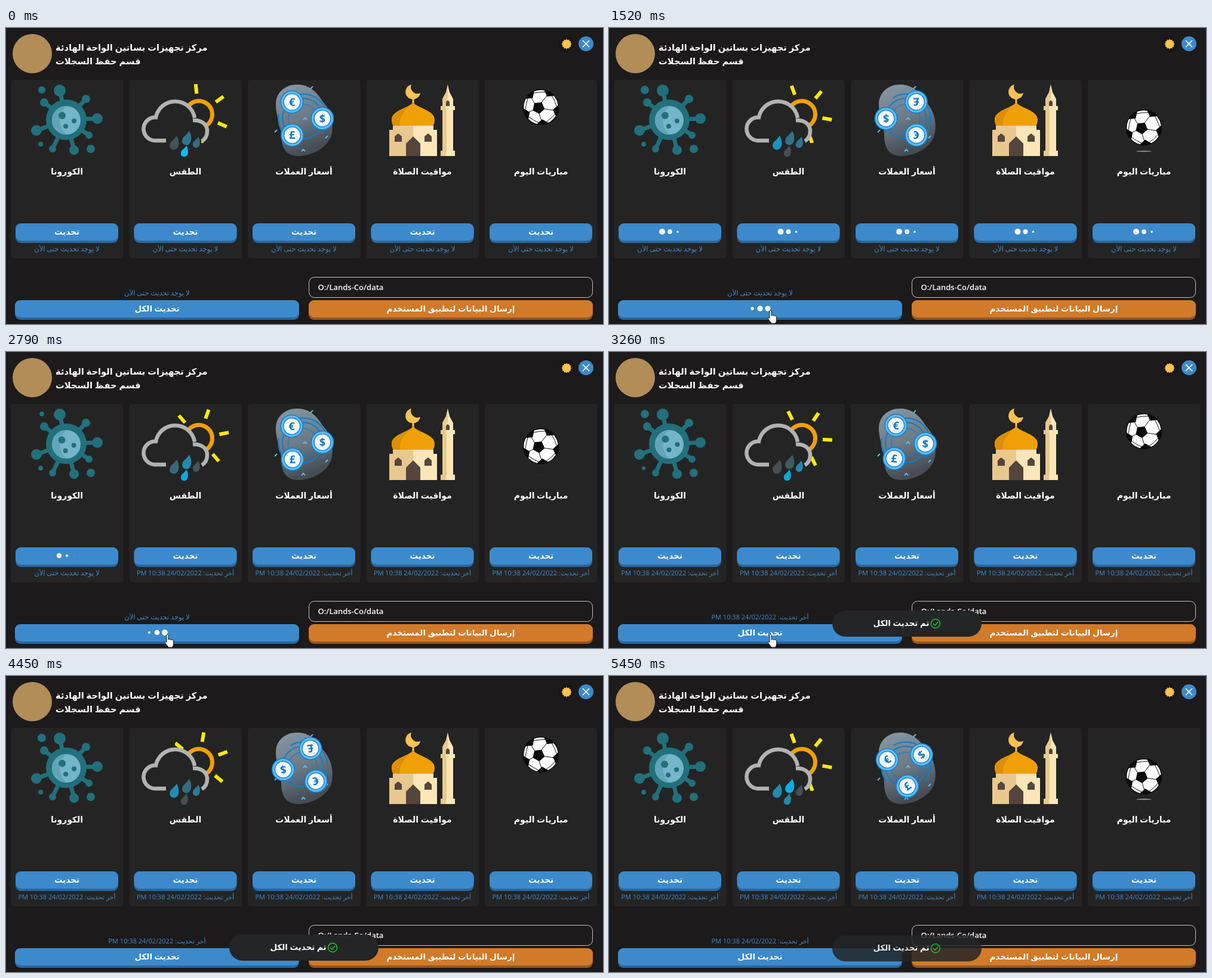
Write an HTML page that moves like this. It is 1000 px wide and 497 px high and loops after 5520 ms.

```html
<!DOCTYPE html>
<html lang="ar">
<head>
<meta charset="utf-8">
<title>لوحة التحديث</title>
<style>
  html, body { margin: 0; width: 100%; height: 100%; overflow: hidden; background: #1c1a1b; }
  svg { display: block; width: 100%; height: 100%; }
  text { direction: rtl; text-anchor: middle; fill: #fff; font: bold 14px "Open Sans", "DejaVu Sans", sans-serif; }
  .head { text-anchor: end; font-size: 14.7px; }
  .btn { font-size: 13.5px; }
  .status { font-size: 11.4px; font-weight: 400; fill: #3d8ccd; }
  .date { font-size: 11px; }
  .path { direction: ltr; text-anchor: start; font-size: 13px; font-weight: 600; }
  .coin { direction: ltr; font-size: 18px; fill: #0f72c4; }
</style>
</head>
<body>
<script>
const LOOP = 5520;
const NONE = 'لا يوجد تحديث حتى الأن';
const DATE = 'أخر تحديث: 24/02/2022 10:38 PM';
const TITLES = ['الكورونا', 'الطقس', 'أسعار العملات', 'مواقيت الصلاة', 'مباريات اليوم'];
const CARD_DONE = [2900, 2600, 2350, 2200, 2000];
const CARD_START = 1290, ALL_START = 1114, ALL_DONE = 2980;

const rad = a => a * Math.PI / 180;
const clamp = x => Math.max(0, Math.min(1, x));
const smooth = x => x * x * (3 - 2 * x);
const mix = (a, b, k) => a + (b - a) * k;
const list = (n, f) => Array.from({ length: n }, (_, i) => f(i)).join('');

const text = (x, y, s, cls = '', more = '') => `<text x="${x}" y="${y}" class="${cls}" ${more}>${s}</text>`;
const rect = (x, y, w, h, rx, fill, more = '') =>
  `<rect x="${x}" y="${y}" width="${w}" height="${h}" rx="${rx}" fill="${fill}" ${more}/>`;
const disc = (x, y, r, fill, more = '') => `<circle cx="${x}" cy="${y}" r="${r}" fill="${fill}" ${more}/>`;
const path = (d, fill, more = '') => `<path d="${d}" fill="${fill}" ${more}/>`;
const polar = (x, y, r, a) => [x + r * Math.cos(rad(a)), y + r * Math.sin(rad(a))];
const poly = (x, y, n, r, turn = 0) =>
  'M' + Array.from({ length: n }, (_, i) => polar(x, y, r, turn + i * 360 / n).map(v => v.toFixed(1))).join('L') + 'Z';

const button = (x, y, w, fill, shade) => rect(x, y, w, 33, 9, shade) + rect(x, y, w, 29, 9, fill);
const dots = (x, y, id) =>
  `<g id="${id}">` + list(3, i => disc(x + (i - 1) * 13, y, 5, '#fff')) + '</g>';

function virus() {
  const knobs = [[90, 105, 10], [134, 119, 7], [153, 152, 9], [139, 180, 6],
    [114, 205, 8], [78, 203, 6], [51, 172, 9], [64, 125, 7]];
  const teal = '#22707c';
  return knobs.map(([x, y, r]) =>
      path(`M101 154L${x} ${y}`, 'none', `stroke="${teal}" stroke-width="7"`) + disc(x, y, r, teal)).join('') +
    disc(101, 154, 34, teal) + disc(101, 155, 24, '#74b5c9') +
    path('M101 131A24 24 0 0 0 101 179A32 32 0 0 1 101 131Z', '#62a5ba') +
    `<g id="spots">${disc(94, 147, 6, teal)}${disc(114, 156, 4, teal)}${disc(100, 165, 4, teal)}</g>` +
    disc(60, 104, 7, teal, 'id="speckA"') + disc(58, 195, 4, teal, 'id="speckB"') + disc(142, 203, 7, teal, 'id="speckC"');
}

function weather() {
  const drop = (x, y, s) => path('M4 -14C10 -5 9 10 0 11C-10 11 -10 1 -5 -4C-1 -8 2 -10 4 -14Z', '#4a4f52',
    `class="drop" transform="translate(${x} ${y}) scale(${s})"`);
  const top = 'M268 189H249A19.5 19.5 0 0 1 251 150A33 33 0 0 1 316 151';
  const side = '155C329 154 337 163 337 173C337 181 333 187 328 190';
  return '<g clip-path="url(#sky)"><g id="rays" stroke="#ffea00" stroke-width="6">' +
    list(6, i => `<path d="M358 145H374" transform="rotate(${i * 60} 323 145)"/>`) + '</g></g>' +
    '<circle cx="323" cy="145" r="22.5" fill="#242424" stroke="#f0a000" stroke-width="7"/>' +
    path(`${top}L316 ${side}Z`, '#242424') +
    path(`${top}M313 ${side}`, 'none', 'stroke="#b2b2b2" stroke-width="6.5"') +
    drop(282, 194, .95) + drop(303, 186, .95) + drop(319, 193, .75) + drop(299, 208, .75);
}

function money() {
  const blue = '#117cca', light = '#5cbcf3';
  const coin = (sign, a) => {
    const [x, y] = polar(497, 152, 33, a);
    return disc(x, y, 19.5, blue) + disc(x, y, 18, light) + disc(x, y, 14.5, blue) + disc(x, y, 13.2, '#f5fbff') +
      text(x, y + 6.5, sign, 'coin');
  };
  return path('M487 95C509 94 523 111 530 123C544 138 549 156 546 176C541 201 513 215 487 215C466 214 461 196 461 179C461 160 452 150 452 128C452 108 468 95 487 95Z', 'url(#stone)') +
    `<g fill="none" stroke="${blue}" stroke-width="2">
      <circle cx="497" cy="152" r="34"/><circle cx="497" cy="152" r="24" stroke-opacity=".6"/>
      <path d="M476 117A41 41 0 0 1 530 177M464 176A41 41 0 0 1 457 145"/></g>
    <path d="M498 154l3 -3l3 3M495 207l3 -3l3 3M450 175l4 -4M535 185l4 -4M510 102l4 -4" fill="none" stroke="${light}" stroke-width="2"/>` +
    '<g id="coins">' + coin('€', -123) + coin('$', 0) + coin('£', 122) + '</g>';
}

function mosque() {
  const cream = '#fce5b6', sand = '#e8c88f', dark = '#54463c';
  const win = x => path(`M${x} 191V182L${x + 6} 177L${x + 12} 182V191Z`, dark);
  return path('M679 95A12.5 12.5 0 1 0 694 109A11 11 0 0 1 679 95Z', '#f6c251') +
    rect(680.5, 119, 3, 9, 0, '#f6c251') +
    path('M682 125C690 135 718 138 718 154Q718 161 714 166H650Q646 161 646 154C646 138 674 135 682 125Z', '#f0a006') +
    path('M682 125C674 135 646 138 646 154Q646 161 650 166H661C656 150 669 137 682 125Z', '#dc9002') +
    rect(648, 164, 68, 8, 0, cream) + rect(642, 171, 80, 44, 0, cream) +
    rect(648, 164, 34, 8, 0, sand) + rect(642, 171, 40, 44, 0, sand) +
    path('M670 215V194L682 182L694 194V215Z', dark) + win(651) + win(701) +
    path('M740 95L743 108L749 119H731L737 108Z', cream) + path('M740 95L737 108L731 119H740Z', sand) +
    rect(731, 119, 18, 96, 0, cream) + rect(731, 119, 7, 96, 0, sand) +
    rect(728, 131, 24, 7, 1, cream) + rect(728, 131, 9, 7, 1, sand) +
    rect(728, 206, 24, 9, 0, cream) + rect(728, 206, 9, 9, 0, sand) +
    path('M737 131V124L740 121L743 124V131Z', dark);
}

function ball() {
  const arms = list(5, i => {
    const a = i * 72 - 60;
    const [hub, rim, bend, next] = [polar(-4, 1, 10, a), polar(0, 0, 30, a), polar(0, 0, 25, a + 36), polar(0, 0, 30, a + 72)];
    return path(`M${hub}L${rim}L${bend}L${next}`, 'none', 'stroke="#111"') + path(poly(...rim, 5, 9.5, a + 180), '#0b0b0b');
  });
  return '<ellipse id="shade" cx="896" cy="207" rx="13" ry="1.2" fill="#8a8a8a"/>' +
    `<g id="ball"><g clip-path="url(#round)">${disc(0, 0, 30, '#fff')}${arms}${path(poly(-4, 1, 5, 10.5, -60), '#0b0b0b')}</g>
    <circle r="29.5" fill="none" stroke="#0b0b0b" stroke-width="1.6"/></g>`;
}

const card = i => {
  const x = 8 + i * 198.5, mid = x + 94;
  return rect(x, 87, 188.5, 300, 5, '#242424') + text(mid, 246, TITLES[i]) +
    button(x + 8, 328, 172, '#3c8acb', '#2a679e') +
    text(mid, 347, 'تحديث', 'btn', `id="label${i}"`) + dots(mid, 342, 'dots' + i) +
    text(mid, 375, NONE, 'status', `id="none${i}"`) + text(mid, 375, DATE, 'status date', `id="date${i}"`);
};

document.body.innerHTML = `<svg viewBox="0 0 1000 497" preserveAspectRatio="none">
  <defs>
    <linearGradient id="stone" x2=".3" y2="1"><stop stop-color="#8799a5"/><stop offset=".55" stop-color="#6c7b86"/><stop offset="1" stop-color="#464c54"/></linearGradient>
    <clipPath id="round"><circle r="30"/></clipPath>
    <clipPath id="sky"><path d="M283 85H380V193H327V160H283Z"/></clipPath>
  </defs>
  ${rect(0, 0, 1000, 497, 0, '#1c1a1b')}
  ${disc(44, 43, 33, '#b28d58')}
  ${text(83, 38, 'مركز تجهيزات بساتين الواحة الهادئة', 'head')}
  ${text(83, 61, 'قسم حفظ السجلات', 'head')}
  ${disc(939, 27, 13, '#181617')}
  ${[0, 30, 60].map(a => path(poly(939, 27, 4, 8.6, a), '#f3b63f')).join('')}
  ${disc(939, 27, 6, '#f8c450')}
  ${disc(971.5, 26.5, 12.5, '#3c8acb')}
  ${path('M966 21l11 11m0 -11l-11 11', 'none', 'stroke="#fff" stroke-width="1.6"')}
  ${list(5, card)}
  ${virus()}${weather()}${money()}${mosque()}${ball()}
  ${text(253, 449, NONE, 'status', 'id="none5"')}${text(253, 449, DATE, 'status date', 'id="date5"')}
  ${rect(15, 457, 476, 33, 9, '#2a679e')}
  <g id="press">${rect(15, 457, 476, 29, 9, '#3c8acb')}
    ${text(253, 476, 'تحديث الكل', 'btn', 'id="label5"')}${dots(253, 471, 'dots5')}</g>
  ${rect(507.5, 418.5, 475, 34, 9, '#1c1a1b', 'stroke="#c4c4c4"')}
  ${text(522.5, 440, 'O:/Lands-Co/data', 'path')}
  ${button(507, 457, 476, '#d17a29', '#955823')}
  ${text(745, 476, 'إرسال البيانات لتطبيق المستخدم', 'btn')}
  <g id="toast">${rect(374, 434, 250, 44, 22, '#232527')}
    ${text(489.5, 460, 'تم تحديث الكل', 'btn')}
    <g fill="none" stroke="#17c832" stroke-width="1.5"><circle cx="547" cy="456" r="7.5"/><path d="M543 456l3 3l5.5 -6"/></g></g>
  <path id="hand" d="M3 1.5c0-2 3-2 3 0V9c0-1.6 3-1.4 3 .3c0-1.2 2.9-1 2.9 .6c0-1 2.8-.8 2.8 .9V16c0 3-1.5 4-2 6H6c-.8-2-3-4-5-7c-1.4-2.4 .6-3.4 2-1.6Z" fill="#fff" stroke="#111"/>
</svg>`;

const $ = id => document.getElementById(id);
const show = (id, level) => $(id).setAttribute('opacity', +level);
const move = (id, v) => $(id).setAttribute('transform', v);
const drops = [...document.querySelectorAll('.drop')];
const DROP_PEAKS = [1950, 2280, 800, 3000];

// Distance between two moments of a 3 s cycle
const gap = (t, at) => {
  const d = Math.abs(t - at) % 3000;
  return Math.min(d, 3000 - d);
};

function loading(i, t, start, done, period) {
  const busy = t >= start && t < done;
  show('label' + i, !busy);
  show('dots' + i, busy);
  show('none' + i, t < done);
  show('date' + i, t >= done);
  [...$('dots' + i).children].forEach((dot, k) => {
    const p = (Math.max(t - start, 0) + (2 - k) * 160) % period / period;
    dot.setAttribute('r', 5 * smooth(clamp(1 - Math.abs(p - .4) / .4)));
  });
}

function draw(t) {
  const cycle = t % 3000;

  [['speckA', 7, 2400, 700], ['speckB', 4, 650, 500], ['speckC', 7, 800, 500]].forEach(([id, r, at, width]) =>
    $(id).setAttribute('r', r * clamp(gap(cycle, at) / width)));
  const sway = Math.sin(cycle / 3000 * 2 * Math.PI);
  move('spots', `translate(${sway} ${-1.5 * sway})`);

  move('rays', `rotate(${24 + .0304 * t} 323 145)`);
  drops.forEach((d, i) => {
    const k = clamp(1 - gap(cycle, DROP_PEAKS[i]) / 1100);
    d.setAttribute('fill', `rgb(${[[72, 0], [78, 191], [82, 255]].map(([a, b]) => Math.round(mix(a, b, k)))})`);
  });

  const u = clamp((t % 2985 - 240) / 2560);
  move('coins', `rotate(${360 * mix(smooth(u), u, .66)} 497 152)`);

  const hop = ((Math.max(t, 640) - 1555) / 654 + 3) % 1;
  const y = 131 + 45 * (2 * hop - 1) ** 2;
  move('ball', `translate(896 ${y})`);
  show('shade', clamp((y - 158) / 10));

  CARD_DONE.forEach((done, i) => loading(i, t, CARD_START, done, 1400));
  loading(5, t, ALL_START, ALL_DONE, 1230);
  move('press', `translate(0 ${t > 960 && t < 1100 ? 3 : 0})`);

  const rise = smooth(clamp((t - ALL_DONE) / 260)), fall = clamp((t - 5420) / 200);
  show('toast', rise * (1 - fall));
  move('toast', `translate(0 ${12 * (1 - rise) + 8 * fall})`);

  const come = smooth(clamp((t - 130) / 430)), leave = clamp((t - 3850) / 250) ** 2;
  show('hand', t > 130 && t < 4100);
  move('hand', `translate(${mix(680, 266, come)} ${mix(490, 474, come) + 24 * leave})`);
}

const start = performance.now();
function tick() {
  draw((performance.now() - start) % LOOP);
  requestAnimationFrame(tick);
}
tick();
</script>
</body>
</html>
```
